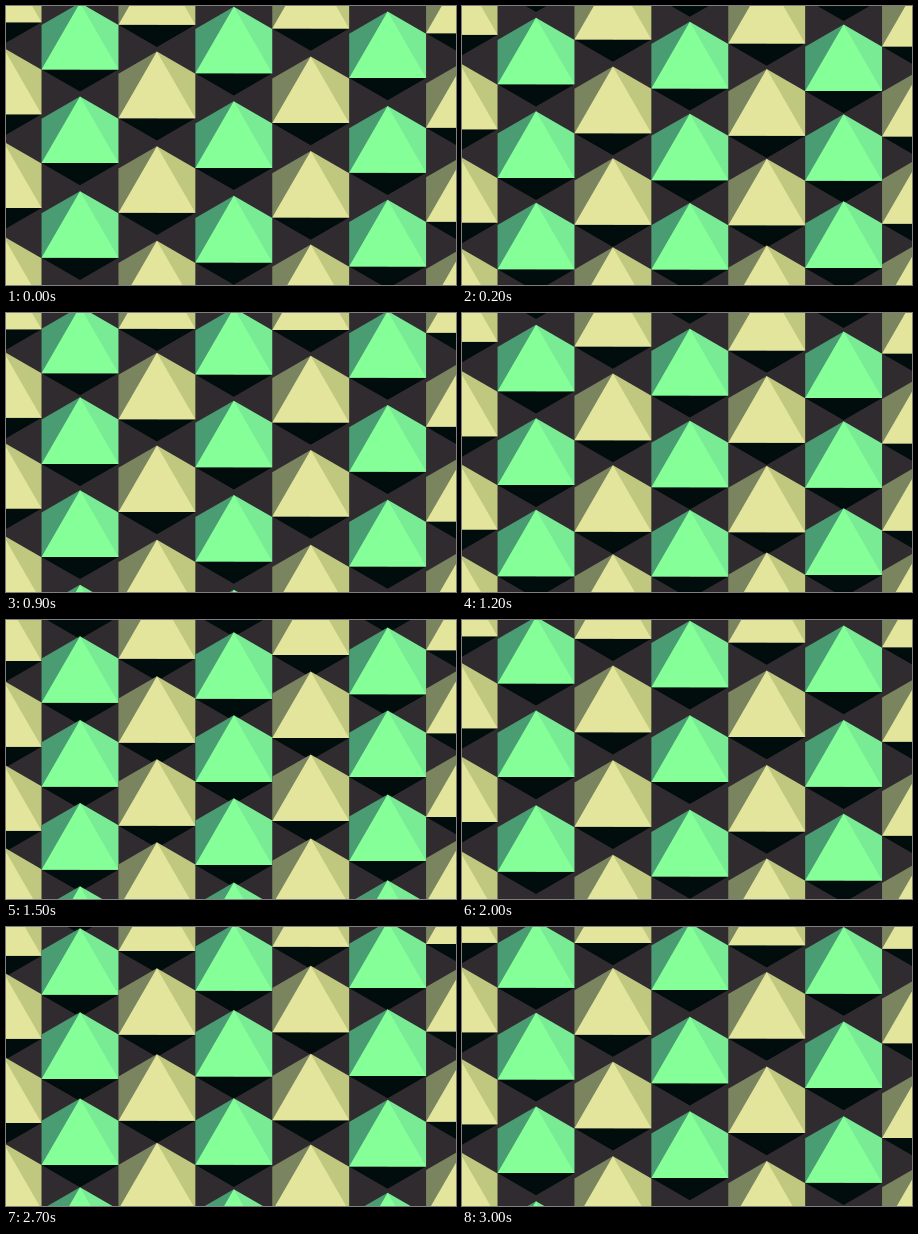
Write an HTML page with a canvas that moves like this. It is 450 px wide and 279 px high and loops after 3100 ms.

```html
<!DOCTYPE html>
<html lang="en">
<head>
<meta charset="utf-8">
<title>Pyramid wave</title>
<style>
  html, body { margin: 0; width: 100%; height: 100%; overflow: hidden; background: #2f2b2f; }
  canvas { display: block; }
</style>
</head>
<body>
<canvas id="stage" width="450" height="279"></canvas>
<script>
const ctx = document.getElementById('stage').getContext('2d');

const LOOP = 3100, STEP = 100, PERIOD = 1000, LAST = 2930;
const R = 44.4;                   // hexagon radius
const W = R * Math.sqrt(3) / 2;   // half a column
const MID = { x: 227.8, y: 95.3 };
const AMP = 13, COL_LAG = 0.19, ROW_LAG = 0.46;

const BACK = '#2f2b2f', UNDER = '#010c0c';
const GREEN = { left: '#4a9c72', front: '#85ff98', right: '#79eb95' };
const YELLOW = { left: '#7a8560', front: '#e2e59b', right: '#c0c77f' };

function fill(color, points) {
  ctx.fillStyle = color;
  ctx.beginPath();
  for (const [x, y] of points) ctx.lineTo(x, y);
  ctx.fill();
}

function pyramid(x, y, skin) {
  const apex = [x, y], tip = [x, y + 2 * R];
  const lt = [x - W, y + R / 2], lb = [x - W, y + R * 1.5];
  const rt = [x + W, y + R / 2], rb = [x + W, y + R * 1.5];
  const foot = [x, y + R * 1.5];
  fill(UNDER, [lb, rb, tip]);
  // side faces run under the front face to hide seams
  fill(skin.left, [apex, lt, lb, foot]);
  fill(skin.right, [apex, rt, rb, foot]);
  fill(skin.front, [apex, lb, rb]);
}

function draw(time) {
  const phase = 2 * Math.PI * Math.min(time, LAST) / PERIOD;
  ctx.fillStyle = BACK;
  ctx.fillRect(0, 0, 450, 279);
  for (let col = -3; col <= 3; col++) {
    const odd = Math.abs(col % 2);
    for (let n = -3; n <= 3; n++) {
      const row = n + odd / 2;
      const lift = AMP * Math.sin(phase + col * COL_LAG + row * ROW_LAG);
      pyramid(MID.x + col * 2 * W, MID.y + row * 2 * R + lift, odd ? YELLOW : GREEN);
    }
  }
}

const start = performance.now();
function tick() {
  const t = (performance.now() - start) % LOOP;
  draw(Math.floor(t / STEP) * STEP);
  requestAnimationFrame(tick);
}
tick();
</script>
</body>
</html>
```
